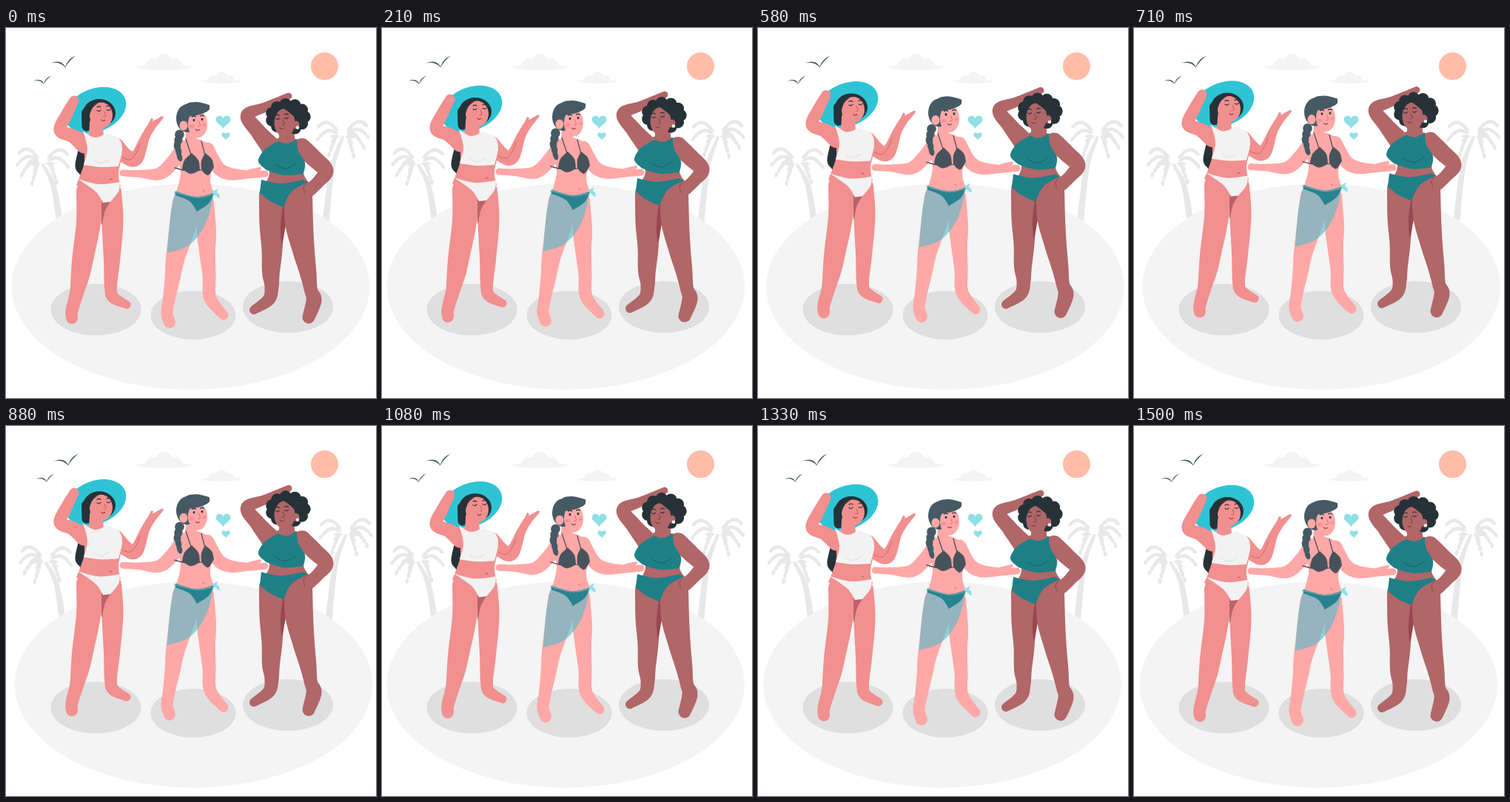
Animation, 500 px wide and 500 px high, one loop 1.54 s. Source, as an HTML page with a canvas:

```html
<!DOCTYPE html>
<html lang="en">
<head>
<meta charset="utf-8">
<title>Beach friends</title>
<style>
html, body { margin: 0; width: 100%; height: 100%; overflow: hidden; background: #fff; }
canvas { display: block; width: 500px; height: 500px; }
</style>
</head>
<body>
<canvas id="stage" width="500" height="500"></canvas>
<script>
const ctx = document.getElementById('stage').getContext('2d');
const LOOP = 1540, TAU = Math.PI * 2;
const INK = '#263238', SLATE = '#455a64', TEAL = '#1f7f87', WHITE = '#f2f2f2';
const ROSE = '#f28f8f', PINK = '#ffa8a7', BROWN = '#b16668', AQUA = '#92dfe6';
const LEAF = '#e8e8e8', SHADE = '#dfdfdf', CLOUD = '#f4f4f4';

const range = n => Array.from({ length: n }, (_, i) => i);
const parse = spec => spec.trim().split(/\s+/).map(s => s.split(',').map(Number));

// Smooth spline through "x,y" points; "/" marks a sharp corner.
function curve(spec) {
  const path = new Path2D();
  let last;
  for (const part of spec.split('/')) {
    const pts = parse(part);
    if (last) pts.unshift(last);
    else path.moveTo(...pts[0]);
    for (let i = 0; i < pts.length - 1; i++) {
      const b = pts[i], c = pts[i + 1], a = pts[i - 1] || b, d = pts[i + 2] || c;
      path.bezierCurveTo(b[0] + (c[0] - a[0]) / 6, b[1] + (c[1] - a[1]) / 6,
        c[0] - (d[0] - b[0]) / 6, c[1] - (d[1] - b[1]) / 6, c[0], c[1]);
    }
    last = pts[pts.length - 1];
  }
  return path;
}
const fill = (color, spec) => ({ color, path: curve(spec) });
const line = (color, width, spec) => ({ color, width, path: curve(spec) });
function oval(color, x, y, rx, ry = rx, tilt = 0, from = 0) {
  const path = new Path2D();
  path.ellipse(x, y, rx, ry, tilt, from, TAU);
  return { color, path };
}

// Rounded tube through "x,y,radius" joints.
function limb(color, spec) {
  const joints = parse(spec), tube = [], steps = 16;
  for (let i = 0; i < joints.length - 1; i++) {
    const b = joints[i], c = joints[i + 1], a = joints[i - 1] || b, d = joints[i + 2] || c;
    for (let k = i ? 1 : 0; k <= steps; k++) {
      const u = k / steps;
      tube.push(b.map((v, n) => v + u / 2 * (c[n] - a[n]
        + u * (2 * a[n] - 5 * v + 4 * c[n] - d[n] + u * (3 * (v - c[n]) + d[n] - a[n])))));
    }
  }
  const path = new Path2D(), end = tube.length - 1;
  const heading = i => {
    const p = tube[Math.max(i - 1, 0)], q = tube[Math.min(i + 1, end)];
    return Math.atan2(q[1] - p[1], q[0] - p[0]);
  };
  const edge = (i, turn) => {
    const [x, y, r] = tube[i], a = heading(i) + turn;
    path.lineTo(x + r * Math.cos(a), y + r * Math.sin(a));
  };
  const cap = (i, turn) => path.arc(...tube[i], heading(i) + turn, heading(i) + turn + Math.PI);
  for (let i = 0; i <= end; i++) edge(i, -Math.PI / 2);
  cap(end, -Math.PI / 2);
  for (let i = end; i >= 0; i--) edge(i, Math.PI / 2);
  cap(0, Math.PI / 2);
  return { color, path };
}

// Brows, eyes, nose and mouth around the point between the eyes.
function face(x, y, gap, open, tint) {
  const sides = [-1, 1].flatMap(s => {
    const ex = x + s * gap / 2, ey = y - s * .5;
    return [
      line(INK, 1.2, `${ex - 2.5},${ey - 4.5} ${ex},${ey - 5.5} ${ex + 2.5},${ey - 4.5}`),
      open ? oval(INK, ex, ey, 1.4, 1.8)
        : line(INK, 1.1, `${ex - 2.5},${ey} ${ex},${ey + 1} ${ex + 2.5},${ey - .5}`)
    ];
  });
  return [...sides,
    line(tint, 1, `${x + 1},${y + 2} ${x + 3},${y + 8} ${x},${y + 9}`),
    line('#85343e', 1.1, `${x - 3},${y + 13} ${x - 1},${y + 14.5} ${x + 2},${y + 13.5}`)];
}

function cloud(x, base, w) {
  return [oval(CLOUD, x, base, w / 2, w * .05), ...[-1, 0, 1].map(i =>
    oval(CLOUD, x + i * w * .19, base, w * (.19 - .04 * i * i), w * (.24 - .09 * i * i), 0, Math.PI))];
}

function heart(x, y, size) {
  const path = new Path2D();
  for (const i of range(60)) {
    const a = i / 60 * TAU;
    path.lineTo(x + size * 16 * Math.sin(a) ** 3, y - size
      * (13 * Math.cos(a) - 5 * Math.cos(2 * a) - 2 * Math.cos(3 * a) - Math.cos(4 * a)));
  }
  return { color: AQUA, path };
}

function bird(x, y, size) {
  const path = new Path2D();
  for (const [dx, dy] of [[14, -15], [-20, -5]]) {
    const tx = x + dx * size, ty = y + dy * size;
    path.moveTo(x, y);
    path.quadraticCurveTo(x + dx * .25 * size, y - 11 * size, tx, ty);
    path.quadraticCurveTo(x + dx * .35 * size, y - 8 * size, x, y + size);
  }
  return { color: SLATE, path };
}

// Drooping fronds with leaflets around a crown.
function palm(x, y, side, height) {
  const path = new Path2D();
  const leaf = (px, py, a, length, width) => {
    const ux = Math.cos(a) * length, uy = Math.sin(a) * length;
    const nx = -Math.sin(a) * width, ny = Math.cos(a) * width;
    path.moveTo(px, py);
    path.quadraticCurveTo(px + ux / 2 + nx, py + uy / 2 + ny, px + ux, py + uy);
    path.quadraticCurveTo(px + ux / 2 - nx, py + uy / 2 - ny, px, py);
  };
  for (const degrees of [118, 150, 178, 208, 335, 8, 55]) {
    const a = degrees / 360 * TAU, dx = Math.cos(a) * 37 * side, dy = Math.sin(a) * 35;
    for (const i of range(6)) {
      const u = .15 + i * .14, rise = 12 * u * (1 - u) * 4;
      const px = x + dx * u, py = y + dy * u - rise;
      const bend = Math.atan2(dy - 48 * (1 - 2 * u), dx);
      leaf(px, py, bend + .25 * Math.sign(dx), 14 - i, 5);
    }
  }
  const foot = x + side * 23;
  return [limb(LEAF, `${x},${y},2 ${x + side * 14},${y + height * .35},3.5 ${foot},${y + height},4.5`),
    { color: LEAF, path }];
}

const sky = [
  oval('#ffbda8', 430.5, 51.7, 18.6),
  ...cloud(213.5, 53, 75), ...cloud(291, 72, 54)
];
const backdrop = [
  ...palm(50, 185, 1, 80), ...palm(455, 148, -1, 115),
  oval('#f4f4f4', 249.5, 349.5, 241.7, 139.3),
  bird(80, 52.5, 1), bird(51, 75, .7)
];
const ground = [
  oval(SHADE, 121.5, 380.5, 61, 35),
  oval(SHADE, 253, 388, 57.5, 33),
  oval(SHADE, 381, 377, 61, 35),
  heart(293.5, 126, .62), heart(297, 145.5, .36)
];

const left = [
  oval('#2ec4d6', 121, 111, 43, 29, -.38),
  oval(INK, 126, 115, 22, 19),
  limb(INK, '109,115,7 109,133,6.5'),
  limb(INK, '102,168,5 100,187,6.5 102,196,3'),
  limb(ROSE, '143,222,13 144,262,14.5 143,315,11 141.5,350,8.5 145,364,8 163,374,5.5'),
  fill('#b9636a', '129,230 129,266 134,247 143,232 / 129,230'),
  limb(ROSE, '122,128,9 122,148,10'),
  fill(ROSE, '104,142 106,178 101,197 95,212 / 125,234 155,214 / 152,196 157,168 148,147 / 104,142'),
  limb(ROSE, '112,221,17 111.5,262,16.5 104,310,14.5 100,336,12.5 95.5,358,9.5 89,382,8.5 89,392,8'),
  limb(ROSE, '106,157,12.5 90,146,9.5 73,138,8.5 82,117,8 92,98,6.5'),
  limb(ROSE, '148,159,11 163,174,10 176,176,9.5 188,148,6 196,134,5.5'),
  limb(ROSE, '198,132,5 211,121,1.8'),
  limb(ROSE, '193,136,3 197,124,1.8'),
  line('#c9626b', .9, '157,175 168,178 176,169 181,157'),
  fill(WHITE, '104,139 120,148 137,142 / 153,150 157,165 152,187 / 128,188 105,185 / 110,163 104,139'),
  line('#dcdcdc', .9, '118,178 128,183 139,178'),
  fill(WHITE, '97,204 125,211 154,208 / 152,221 141,235 / 131,236 / 121,221 97,204'),
  line('#bd5c66', 1.2, '140,205 143,204'),
  oval(ROSE, 128.5, 118, 15.5, 17.5),
  fill(INK, '128,99 117,108 112,121 / 107,112 128,99'),
  ...face(132, 111, 13, false, '#bd5c66')
];

const middle = [
  limb(PINK, '270,236,11 271,275,13 272,302,11 274.5,335,9 276,365,8.5 294,388,6.5'),
  limb(PINK, '243,238,18.5 240,262,18.5 229,310,13 225,338,10.5 220.5,365,8.5 217.5,385,8 221,397.5,8'),
  limb(PINK, '250,138,7 250,154,8'),
  fill(PINK, '232,157 233,178 236,198 229,226 / 258,246 281,224 / 276,205 280,180 274,157 / 257,150 232,157'),
  limb(PINK, '240,162,10 225,182,9.5 207,197,8.5 180,197,5 158,196,4.5'),
  limb(PINK, '272,164,9.5 286,188,9 302,197,8.5 328,198,5.5 350,197,4.5'),
  limb(PINK, '330,195,4 343,190,2'),
  line('#47535c', 1.3, '243,150 251,174'),
  line('#47535c', 1.3, '264,153 269,172'),
  line('#47535c', 1.5, '228,189 239,192 / 263,192'),
  fill('#47535c', '251,169 241,179 238,191 / 250,197 262,192 / 260,179 251,169'),
  fill('#47535c', '269,169 264,180 264,192 / 273,199 281,188 / 278,177 269,169'),
  line('#d8747b', 1.1, '266,219 268,221'),
  fill('rgba(92,188,201,.65)', '229,220 222,255 218,304 / 248,293 270,264 281,224 / 258,229 229,220'),
  fill('#27838f', '229,221 258,228 281,223 / 274,237 258,248 / 248,234 229,226 / 229,221'),
  line('#69a9b3', 1.3, '228,222 258,229 280,225'),
  fill(AQUA, '278,222 287,217 / 285,222 288,224 / 288,230 278,222'),
  ...range(5).map(i => oval(SLATE, 233 + 1.5 * Math.cos(i * 1.6), 144 + i * 7.5, 6.3 - i * .7, 6.5, .3 - i * .15)),
  oval(SLATE, 245, 122, 15, 19),
  oval(PINK, 259, 130, 13, 18.5),
  oval(PINK, 240, 132, 5.5, 6.5),
  fill(SLATE, '234,116 243,103 258,100 275,104 / 274,111 262,117 246,120 / 234,116'),
  oval('#ff8f93', 251, 133, 3.4, 2.4),
  oval('#ff8f93', 268, 131, 2.4, 2.2),
  ...face(259.5, 124, 11, true, '#db6d77')
];

const right = [
  limb(BROWN, '360,226,18 359,265,16.5 359.5,300,14 358,330,12 359,350,9.5 355,367,8.5 335,381,6'),
  fill('#98474f', '375,235 371,267 373,292 378,267 384,240 / 375,235'),
  limb(BROWN, '395,222,19 396,262,19 402,300,15 408,330,11.5 412,354,9 416,368,10.5 409,391,8.5'),
  limb(BROWN, '379,138,10 380,156,11'),
  fill(BROWN, '345,165 356,196 343,220 / 412,222 402,196 400,152 / 370,148 345,165'),
  limb(BROWN, '355,157,13 340,139,10.5 326,118,9 350,107,6.5 382,92,4.5'),
  limb(BROWN, '400,161,12 417,177,11.5 432,193,10.5 422,208,8.5 410,219,9'),
  line('#8f444c', .9, '406,210 402,216 404,224'),
  fill(TEAL, '368,153 380,156 393,150 / 395,166 404,182 402,197 / 376,199 352,192 / 341,180 350,164 368,153'),
  line('#155f68', .9, '364,185 378,190 392,183'),
  fill(TEAL, '345,205 372,210 401,205 / 408,208 / 386,221 375,242 / 357,234 343,223 / 345,205'),
  // ring of curls
  ...range(11).map(i => i / 11 * TAU).map(a =>
    oval(INK, 381 + 22.5 * Math.cos(a), 120 + 17 * Math.sin(a), 8.2)),
  oval(INK, 381, 120, 21, 18),
  oval(BROWN, 376.5, 128, 14, 19),
  oval(BROWN, 392, 131, 4.5, 5.5),
  fill(INK, '361,118 368,104 380,102 392,122 / 380,112 372,109 361,118'),
  oval('#fff', 394, 134.5, 2.2),
  ...face(373, 122, 12, false, '#803740')
];

// Breeze: slow drift with two quick resets.
function drift(t) {
  if (t < 560) return -2.9 * t / 560;
  if (t < 980) return 3.3 + (t - 560) / 500;
  return -1.8 * (1 - (t - 980) / 560);
}
const lift = t => -4.2 * (1 + Math.cos((t - 735) / LOOP * TAU));

function draw(parts, dx = 0, dy = 0) {
  ctx.save();
  ctx.translate(dx, dy);
  for (const { color, width, path } of parts) {
    ctx.fillStyle = ctx.strokeStyle = color;
    ctx.lineWidth = width || 1;
    if (width) ctx.stroke(path);
    else ctx.fill(path);
  }
  ctx.restore();
}

function render(now) {
  const t = now % LOOP;
  ctx.fillStyle = '#fff';
  ctx.fillRect(0, 0, 500, 500);
  ctx.lineCap = ctx.lineJoin = 'round';
  draw(sky);
  draw(backdrop, drift(t));
  draw(ground);
  for (const person of [left, right, middle]) draw(person, 0, lift(t));
}

const start = performance.now();
function tick() {
  render(performance.now() - start);
  requestAnimationFrame(tick);
}
tick();
</script>
</body>
</html>
```
